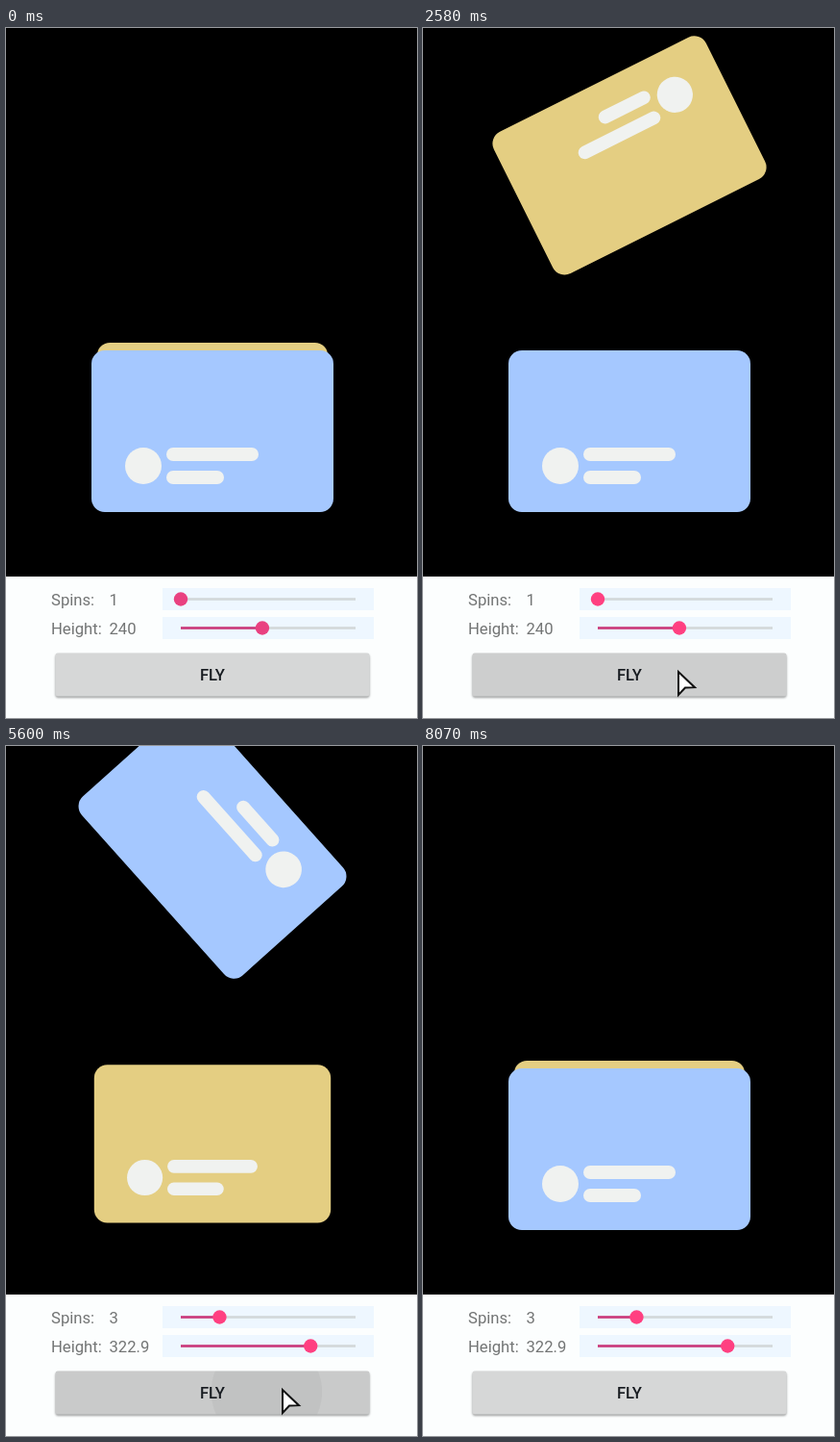
An HTML page that plays this animation: 428x717 px, repeating every 8220 ms.

```html
<!DOCTYPE html>
<html lang="en">
<head>
<meta charset="utf-8">
<title>Flying cards</title>
<style>
  html, body { margin: 0; width: 100%; height: 100%; overflow: hidden; background: #000; }
  svg { display: block; }
  text { font: 16.65px Roboto, sans-serif; fill: #737575; }
  .fly { font-weight: 500; fill: #171b20; text-anchor: middle; }
  .well { fill: #eef7ff; }
  .track { fill: #d3d8d9; }
  .fill { fill: #cc3a7c; }
  .mark { fill: #f0f2f0; }
</style>
</head>
<body>
<svg width="428" height="717" viewBox="0 0 428 717">
  <defs>
    <g id="face" class="mark">
      <rect x="-126" y="-84" width="252" height="168" rx="14" fill="inherit" style="fill: var(--c)"/>
      <circle cx="-72" cy="36" r="19"/>
      <rect x="-48" y="17" width="96" height="14" rx="7"/>
      <rect x="-48" y="41" width="60" height="14" rx="7"/>
    </g>
    <clipPath id="btn"><rect x="51.5" y="649.5" width="327" height="45" rx="2.4"/></clipPath>
    <filter id="soft" x="-5%" y="-20%" width="110%" height="150%"><feGaussianBlur stdDeviation="1.3"/></filter>
  </defs>

  <rect width="428" height="717"/>
  <g id="stack">
    <use id="gold" href="#face" style="--c: #e4ce82"/>
    <use id="blue" href="#face" style="--c: #a5c8ff"/>
  </g>

  <rect y="570" width="428" height="147" fill="#fcfefe"/>
  <text x="47" y="600">Spins:</text>
  <text x="107.5" y="600" id="spins">1</text>
  <text x="47" y="630">Height:</text>
  <text x="107.5" y="630" id="height">240</text>

  <g id="sliders"></g>

  <rect x="51.5" y="651" width="327" height="45" rx="2.4" fill="#000" opacity=".38" filter="url(#soft)"/>
  <rect x="51.5" y="649.5" width="327" height="45" rx="2.4" fill="#d6d7d7"/>
  <g clip-path="url(#btn)">
    <rect id="press" x="51" y="649" width="328" height="46"/>
    <circle id="ripple" cy="671"/>
  </g>
  <text class="fly" x="215" y="677.5">FLY</text>

  <circle id="dot" r="12" fill="#5a95bf"/>
  <path id="cursor" d="M1 2V26L8 18.6L18 18.2Z" fill="#fff" stroke="#111" stroke-width="2"/>
</svg>
<script>
const LOOP = 8220, FLIGHT = 800, DP = 1.175;
const $ = id => document.getElementById(id);
const clamp = x => Math.min(1, Math.max(0, x));
const mix = (a, b, k) => a + (b - a) * k;

// start of the motion, first moment it shows, touch x
const flights = [
  { start: 1002, show: 1005, x: 266 },
  { start: 2240, show: 2255, x: 266 },
  { start: 5432, show: 5525, x: 288 },
  { start: 6962, show: 6975, x: 288 }
];

// time, x, y of the pointer tip
const path = [
  [70, 290, 685], [140, 276, 673], [220, 267, 667], [370, 265, 667],
  [2600, 265, 667], [3000, 230, 584], [3750, 230, 584], [3900, 236, 589],
  [4210, 298, 622], [4370, 316, 624], [4640, 316, 624], [5070, 290, 667],
  [5290, 287, 667], [7150, 287, 667], [7600, 366, 720]
];

// touch marker: on, off
const taps = [[680, 850], [2010, 2090], [3350, 3430], [4450, 4520], [5290, 5370], [6750, 6830]];

const sliders = [593.5, 623.5].map(y => {
  const g = document.createElementNS("http://www.w3.org/2000/svg", "g");
  g.innerHTML =
    `<rect class="well" x="163" y="${y - 11.5}" width="220" height="23"/>
     <rect class="track" x="182" y="${y - 1.3}" width="182" height="2.6"/>
     <rect class="fill" x="182" y="${y - 1.3}" height="2.6"/>
     <circle cy="${y}" r="7.2"/>`;
  $("sliders").append(g);
  return (k, color) => {
    g.children[2].setAttribute("width", 182 * k);
    g.children[3].setAttribute("cx", 182 + 182 * k);
    g.children[3].setAttribute("fill", color);
  };
});

function place(card, depth, lift = 0, turn = 0) {
  const y = 419 - 12 * depth - lift;
  card.setAttribute("transform", `translate(215 ${y}) rotate(${turn}) scale(${1 - 0.047 * depth})`);
}

function drawCards(t, spins, height) {
  const i = Math.max(0, flights.findLastIndex(f => t >= f.show));
  const f = flights[i];
  const p = t < f.show ? 0 : clamp((t - f.start) / FLIGHT);
  const [flyer, other] = i % 2 ? [$("gold"), $("blue")] : [$("blue"), $("gold")];
  const lift = height * DP * (1 - Math.abs(1 - 2 * p) ** 3.3);
  place(flyer, p, lift, 360 * spins * p);
  place(other, 1 - clamp(p / 0.4));
  const top = p < 0.5 ? flyer : other;
  if ($("stack").lastElementChild !== top) $("stack").append(top);

  const age = t < f.show ? 1e4 : t - f.show;
  const grow = clamp((age + 15) / 260);
  $("press").setAttribute("opacity", 0.06 * clamp((age + 15) / 70) * clamp((800 - age) / 650));
  $("ripple").setAttribute("opacity", 0.04 * clamp((300 - age) / 180));
  $("ripple").setAttribute("r", 165 * grow);
  $("ripple").setAttribute("cx", mix(f.x, 215, clamp(grow * 0.65)));
}

function drawPointer(t) {
  const n = path.findIndex(k => k[0] > t);
  const b = path[n < 0 ? path.length - 1 : n], a = path[n < 0 ? path.length - 1 : Math.max(0, n - 1)];
  const k = a === b ? 0 : (t - a[0]) / (b[0] - a[0]);
  const x = mix(a[1], b[1], k), y = mix(a[2], b[2], k);
  $("cursor").setAttribute("transform", `translate(${x} ${y})`);
  $("cursor").setAttribute("visibility", t >= 70 && t < 7600 ? "visible" : "hidden");
  $("dot").setAttribute("cx", x + 1);
  $("dot").setAttribute("cy", y + 3);
  $("dot").setAttribute("visibility", taps.some(([on, off]) => t >= on && t < off) ? "visible" : "hidden");
}

function draw(t) {
  const spins = t < 3600 ? 1 : 3;
  const height = t < 4690 ? 240 : 322.9;
  const color = t < 1005 ? "#e94180" : "#ff4081";
  $("spins").textContent = spins;
  $("height").textContent = height;
  sliders[0]((spins - 1) / 9, color);
  sliders[1]((height - 100) / 300, color);
  drawCards(t, spins, height);
  drawPointer(t);
}

const began = performance.now();
function tick() {
  draw((performance.now() - began) % LOOP);
  requestAnimationFrame(tick);
}
tick();
</script>
</body>
</html>
```
